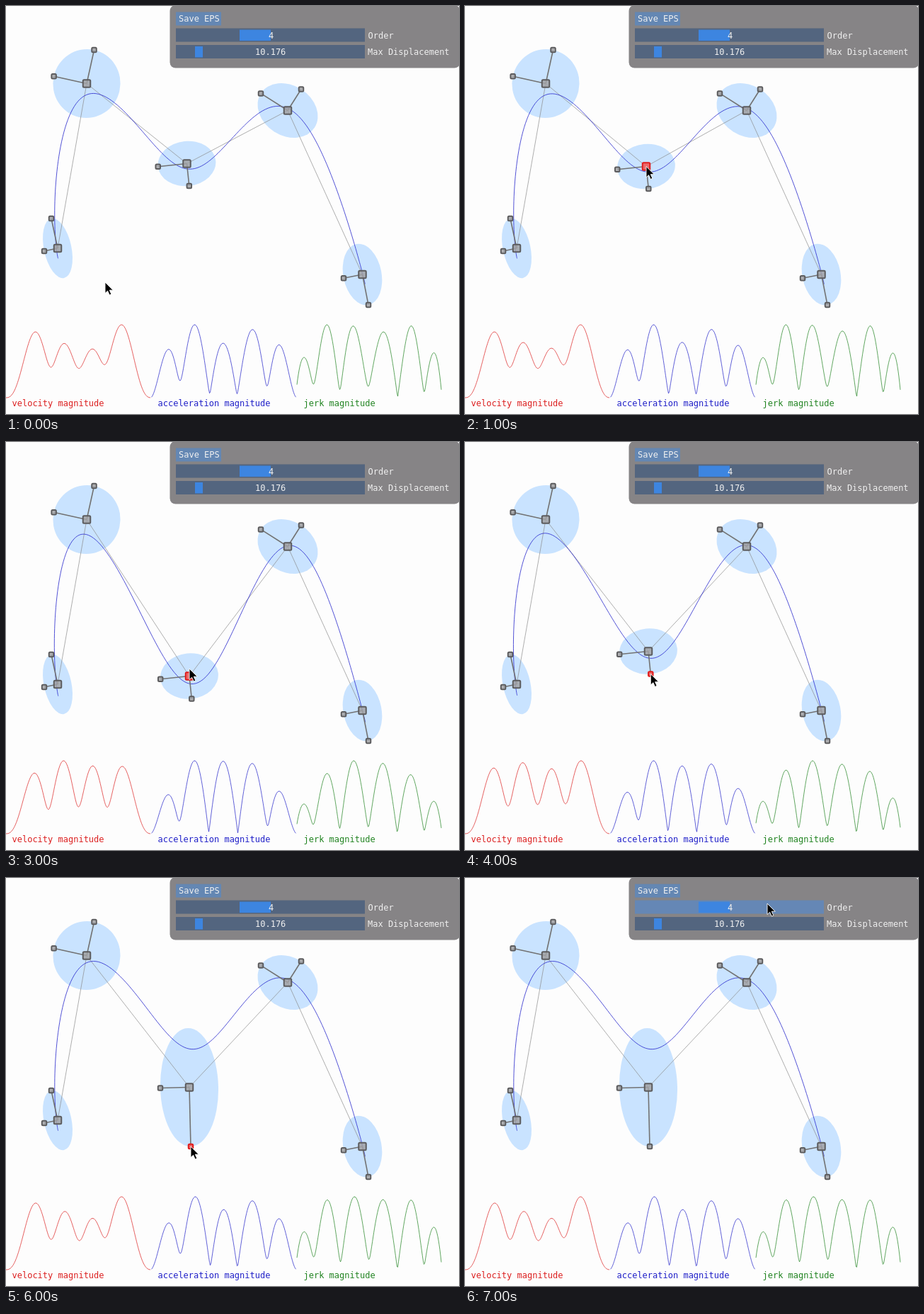
Animation of 640x576 px, one loop 8000 ms. Source, as an HTML page:

```html
<!DOCTYPE html>
<html lang="en">
<head>
<meta charset="utf-8">
<title>Trajectory editor</title>
<style>
  html, body { margin: 0; width: 100%; height: 100%; overflow: hidden; background: #fdfdfd; }
  svg { display: block; width: 640px; height: 576px; }
  text { font: 12px "DejaVu Sans Mono", "Liberation Mono", monospace; white-space: pre; }
  .panel text { fill: #f0f0f0; }
  .track { fill: #53657f; }
  .track.hover { fill: #6587b5; }
  .grab { fill: #3d85e0; }
  .ellipse { fill: #c9e3ff; }
  .guide { fill: none; stroke: #8c8c8c; stroke-width: .7; }
  .curve { fill: none; stroke: #2828cc; stroke-width: .8; }
  .arm { stroke: #727272; stroke-width: 1.6; }
  .box { fill: #a2a2a4d8; stroke: #5c5c5e; stroke-width: 2; }
  .box.active { fill: #ec6a6a; stroke: #e01c1c; }
  .chart path { fill: none; stroke: currentColor; stroke-width: .7; }
  .chart text { fill: currentColor; }
</style>
</head>
<body>
<svg viewBox="0 0 640 576">
  <g id="scene"></g>
  <g id="charts"></g>
  <g class="panel">
    <rect x="231.500" y="-1" width="410" height="88.500" rx="8" fill="#868486"/>
    <rect x="240" y="8.500" width="64" height="19" fill="#6487b3"/>
    <text x="244" y="22">Save EPS</text>
    <rect id="order" class="track" x="240" y="31.500" width="267" height="19"/>
    <rect class="grab" x="330" y="33.500" width="44" height="15.500"/>
    <text x="371" y="46">4</text>
    <text x="511.500" y="46">Order</text>
    <rect class="track" x="240" y="55" width="267" height="19"/>
    <rect class="grab" x="267" y="57" width="11" height="15.500"/>
    <text x="352" y="69">10.176</text>
    <text x="511" y="69">Max Displacement</text>
  </g>
  <path id="cursor" d="M0 0V15.500L3.600 12.200 6.200 18 8.800 16.800 6.300 11.200H11.300Z"
        fill="#000" stroke="#fff" stroke-width=".9"/>
</svg>
<script>
const STEP = 1000;       // ms per pose
const SAMPLES = 40;      // curve samples per node
const SPREAD = 38;       // typical ellipse radius, scales the weights
const $ = id => document.getElementById(id);
const clamp = (v, max) => Math.max(0, Math.min(max, v));

// An ellipse with axis handle (ax, ay) and a second one at a right angle to it.
function node(x, y, ax, ay, width) {
  const k = width / Math.hypot(ax, ay);
  return { x, y, arms: [[ax, ay], [ay * k, -ax * k]] };
}

// The middle node is moved, then its lower handle is pulled down.
function pose(x, y, reach, active, cursor) {
  const mid = node(x, y, reach > 50 ? 2 : 3.300, reach, -41);
  const tip = active === "arm" ? [x + mid.arms[0][0], y + reach] : [x, y];
  const nodes = [
    node(73, 342, -9, -42, 19.400),
    node(114, 109.500, 10.500, -47.500, 47.500),
    mid,
    node(398, 147.500, 19, -30, 45),
    node(503.500, 379, 8.500, 43, -27)
  ];
  return { nodes, mid, active, cursor: cursor || tip };
}

const poses = [
  pose(255.500, 222.500, 31.500, "", [140, 390]),
  pose(256, 226.500, 31.500, "mid"),
  pose(259, 341, 32, "mid"),
  pose(259, 330.500, 32, "mid", [259, 320]),
  pose(259, 295.500, 32, "arm"),
  pose(259, 295.500, 76.500, "arm"),
  pose(259, 295.500, 83.500, "arm"),
  pose(259, 295.500, 83.500, "", [427, 36])
];

// Inverse covariance of a node's ellipse.
function precision({ arms: [a, b] }) {
  const la = Math.hypot(...a), lb = Math.hypot(...b);
  const c = a[0] / la, s = a[1] / la;
  const p = (SPREAD / la) ** 2, q = (SPREAD / lb) ** 2;
  return [[p * c * c + q * s * s, (p - q) * c * s], [(p - q) * c * s, p * s * s + q * c * c]];
}

// Gaussian elimination for a positive definite band matrix.
function solveBand(A, b, band) {
  const n = b.length;
  for (let k = 0; k < n; k++) {
    const end = Math.min(k + band, n - 1);
    for (let i = k + 1; i <= end; i++) {
      const f = A[i][k] / A[k][k];
      for (let j = k; j <= end; j++) A[i][j] -= f * A[k][j];
      b[i] -= f * b[k];
    }
  }
  for (let k = n - 1; k >= 0; k--) {
    for (let j = k + 1; j <= Math.min(k + band, n - 1); j++) b[k] -= A[k][j] * b[j];
    b[k] /= A[k][k];
  }
  return b;
}

// Smoothest path (least snap) that tracks each node for an equal time and rests at both ends.
function trajectory(nodes, cutoff) {
  const n = nodes.length * SAMPLES;
  const A = Array.from({ length: 2 * n }, () => new Float64Array(2 * n));
  const b = new Float64Array(2 * n);
  const weights = nodes.map(precision);
  for (let i = 0; i < n; i++) {
    const k = Math.floor(i / SAMPLES);
    for (let r = 0; r < 2; r++) {
      const w = weights[k][r];
      A[2 * i + r][2 * i] += w[0];
      A[2 * i + r][2 * i + 1] += w[1];
      b[2 * i + r] += w[0] * nodes[k].x + w[1] * nodes[k].y;
    }
  }
  const snap = [1, -4, 6, -4, 1];
  const effort = (SAMPLES / cutoff) ** 8;
  for (let s = -3; s < n - 1; s++)
    for (let p = 0; p < 5; p++)
      for (let q = 0; q < 5; q++)
        for (let r = 0; r < 2; r++)
          A[2 * clamp(s + p, n - 1) + r][2 * clamp(s + q, n - 1) + r] += effort * snap[p] * snap[q];
  const flat = solveBand(A, b, 9);
  return Array.from({ length: n }, (_, i) => [flat[2 * i], flat[2 * i + 1]]);
}

// Bisects for the cutoff at which the curve drops by the given height into the middle node.
function fitCutoff(nodes, drop) {
  let lo = 2, hi = 5;
  for (let i = 0; i < 16; i++) {
    const cutoff = (lo + hi) / 2;
    const ys = trajectory(nodes, cutoff).map(p => p[1]);
    const top = Math.min(...ys.slice(SAMPLES, 2 * SAMPLES));
    const dip = Math.max(...ys.slice(2 * SAMPLES, 3 * SAMPLES));
    if (dip - top < drop) lo = cutoff; else hi = cutoff;
  }
  return lo;
}

const toPath = pts => "M" + pts.map(([x, y]) => x.toFixed(2) + " " + y.toFixed(2)).join("L");

// Size of the derivative of the given degree, scaled to the chart height.
function magnitude(pts, degree) {
  const n = pts.length;
  let d = Array.from({ length: n + degree }, (_, i) => pts[clamp(i - 1, n - 1)]);
  for (let k = 0; k < degree; k++)
    d = d.slice(1).map((p, i) => [p[0] - d[i][0], p[1] - d[i][1]]);
  const size = d.map(v => Math.hypot(...v));
  const max = Math.max(...size);
  const left = 205 * (degree - 1);
  return size.map((v, i) => [left + (i + (degree - 1) / 2) / n * 205, 553 - 103 * v / max]);
}

function ellipse({ x, y, arms: [a, b] }) {
  const angle = Math.atan2(a[1], a[0]) * 180 / Math.PI;
  return `<ellipse class="ellipse" rx="${Math.hypot(...a)}" ry="${Math.hypot(...b)}"
    transform="translate(${x} ${y}) rotate(${angle})"/>`;
}

const box = (x, y, size, active) =>
  `<rect class="box${active ? " active" : ""}" x="${x - size / 2}" y="${y - size / 2}"
    width="${size}" height="${size}" rx="1.500"/>`;

function handles({ x, y, arms }, active) {
  const lines = arms.map(([dx, dy]) =>
    `<line class="arm" x1="${x}" y1="${y}" x2="${x + dx}" y2="${y + dy}"/>`);
  const ends = arms.map(([dx, dy], i) => box(x + dx, y + dy, 6.500, i === 0 && active === "arm"));
  return lines.join("") + ends.join("") + box(x, y, 10.500, active === "mid");
}

const charts = [["velocity", "#dc1e1e"], ["acceleration", "#1e1ec8"], ["jerk", "#1e821e"]];
$("charts").innerHTML = charts.map(([name, color], i) =>
  `<g class="chart" color="${color}"><path/><text x="${8.5 + 206 * i}" y="564.500">${name} magnitude</text></g>`
).join("");
const waves = document.querySelectorAll(".chart path");

const cutoff = fitCutoff(poses[2].nodes, 222);
const curves = poses.map(p => trajectory(p.nodes, cutoff));

function draw(step) {
  const { nodes, mid, active, cursor } = poses[step];
  const curve = curves[step];
  $("scene").innerHTML = nodes.map(ellipse).join("")
    + `<polyline class="guide" points="${nodes.map(p => p.x + "," + p.y).join(" ")}"/>`
    + `<path class="curve" d="${toPath(curve)}"/>`
    + nodes.map(p => handles(p, p === mid && active)).join("");
  waves.forEach((wave, i) => wave.setAttribute("d", toPath(magnitude(curve, i + 1))));
  $("cursor").setAttribute("transform", `translate(${cursor})`);
  $("order").classList.toggle("hover", step === poses.length - 1);
}

const start = performance.now();
let shown = -1;
function tick() {
  const step = Math.floor((performance.now() - start) / STEP) % poses.length;
  if (step !== shown) draw(shown = step);
  requestAnimationFrame(tick);
}
tick();
</script>
</body>
</html>
```
